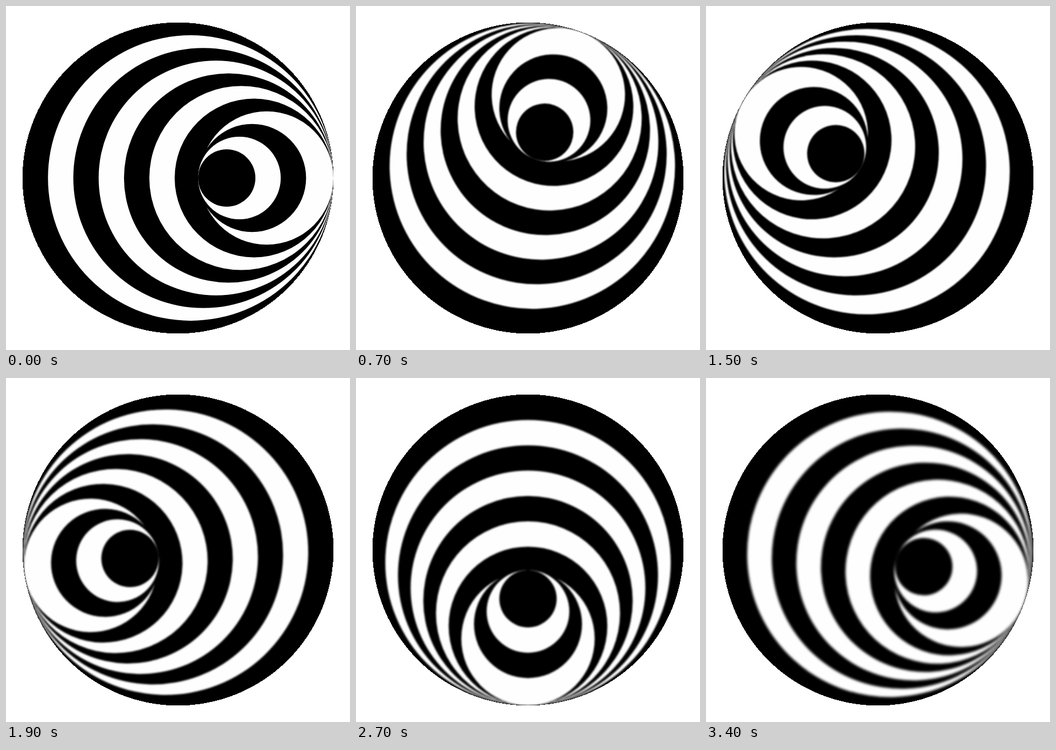
These frames come from a looping animation (600x600 px, 3.5 s). An HTML page:

```html
<!DOCTYPE html>
<html lang="en">
<head>
<meta charset="utf-8">
<title>Rotating rings</title>
<style>
  html, body { margin: 0; height: 100%; overflow: hidden; background: #fff; }
  svg { display: block; width: 100vw; height: 100vh; }
</style>
</head>
<body>
<svg viewBox="0 0 600 600">
  <clipPath id="disc"><circle cx="300" cy="300" r="271"/></clipPath>
  <circle cx="300" cy="300" r="271.3" shape-rendering="crispEdges"/>
  <g clip-path="url(#disc)"><g id="soft"><g id="rings"></g></g></g>
</svg>
<script>
  const soft = document.getElementById('soft');
  const rings = document.getElementById('rings');
  const STEP = 22.1, OUTER = 271, FRAME = 100, FRAMES = 35;

  // Seven rings touch the rim on the right; the last three touch x = 335 on the left.
  for (let k = 1; k <= 10; k++) {
    const r = OUTER - STEP * k;
    const ring = document.createElementNS('http://www.w3.org/2000/svg', 'circle');
    ring.setAttribute('cx', k < 8 ? 571 - r : 335 + r);
    ring.setAttribute('cy', 300);
    ring.setAttribute('r', r);
    ring.setAttribute('fill', k % 2 ? '#fefefe' : '#000');
    rings.append(ring);
  }

  const start = performance.now();
  let shown = -1;

  // Each step turns 10 degrees and softens the edges a little; the loop then snaps back.
  function draw() {
    const n = Math.floor((performance.now() - start) / FRAME) % FRAMES;
    if (n !== shown) {
      shown = n;
      rings.setAttribute('transform', `rotate(${-10 * n} 300 300)`);
      soft.style.filter = n ? `blur(${0.33 * Math.sqrt(n)}px)` : 'none';
    }
    requestAnimationFrame(draw);
  }
  draw();
</script>
</body>
</html>
```
